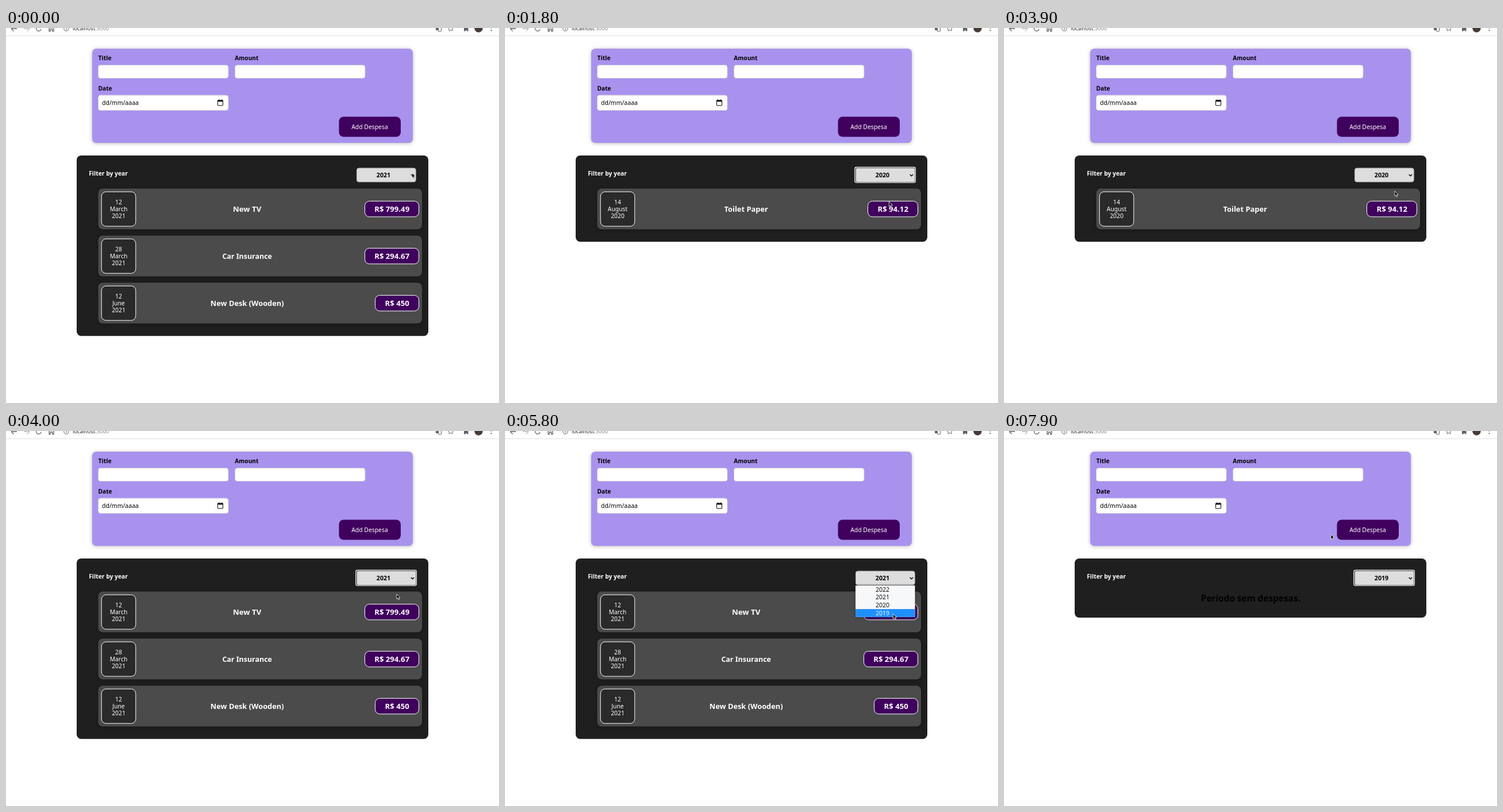
An HTML page for the animation above (8 s loop, 858 px wide and 653 px high).

```html
<!DOCTYPE html>
<html lang="en">
<head>
<meta charset="utf-8">
<title>Expenses by year</title>
<style>
  html, body { margin: 0; width: 100%; height: 100%; overflow: hidden; background: #fff; }
  svg { display: block; font-family: "Noto Sans", "Open Sans", sans-serif; white-space: pre; }
  .shadow { filter: drop-shadow(0 1px 3px rgba(0, 0, 0, .28)); }
</style>
</head>
<body>
<svg id="stage" width="858" height="653" viewBox="0 0 858 653"></svg>
<script>
const LOOP = 8000;
const PURPLE = '#40005d';
const YEARS = [2022, 2021, 2020, 2019];
const EXPENSES = {
  2021: [
    ['12', 'March', 'New TV', 'R$ 799.49', 94, 13.2],
    ['28', 'March', 'Car Insurance', 'R$ 294.67', 94, 12.45],
    ['12', 'June', 'New Desk (Wooden)', 'R$ 450', 76, 12.85]
  ],
  2020: [['14', 'August', 'Toilet Paper', 'R$ 94.12', 87, 12.9]],
  2019: []
};

// Each step: start time, pointer x, pointer y, year, menu (highlighted year or 'blank'), focus ring
const STEPS = [
  [0, 706, 252, 2021],
  [100, 706, 252, 2021, 2021],
  [1800, 668, 302, 2020, 0, true],
  [2100, 674, 297, 2020, 0, true],
  [2200, 688, 283, 2020, 0, true],
  [2300, 703, 269, 2020, 0, true],
  [2400, 712, 261, 2020, 0, true],
  [2600, 711, 260, 2020, 0, true],
  [2700, 710, 259, 2020, 0, true],
  [2900, 710, 259, 2020, 'blank'],
  [3000, 709, 260, 2020, 2020],
  [3100, 702, 264, 2020, 2020],
  [3200, 692, 271, 2020, 2022],
  [3400, 686, 276, 2020, 2022],
  [3500, 682, 282, 2020, 2021],
  [3600, 680, 284, 2020, 2021],
  [3900, 679.5, 283.5, 2020],
  [4000, 679.5, 283.5, 2021, 0, true],
  [4800, 702, 257, 2021, 2021],
  [5000, 672, 274, 2021, 2022],
  [5300, 670, 281, 2021, 2022],
  [5600, 673, 303, 2021, 2020],
  [5800, 675, 318, 2021, 2019],
  [6100, 675, 318, 2019, 0, true],
  [6300, 674.5, 318, 2019, 0, true],
  [6600, 532.5, 313.5, 2019, 0, true],
  [6800, 347, 293, 2019, 0, true],
  [7100, 345.5, 293, 2019, 0, true],
  [7300, 798, 348, 2019, 0, true],
  [7600, 737.5, 312, 2019, 0, true],
  [7900, 568.5, 179.5, 2019, 0, true]
];

const rect = (x, y, w, h, r, fill, extra = '') =>
  `<rect x="${x}" y="${y}" width="${w}" height="${h}" rx="${r}" fill="${fill}" ${extra}/>`;
const path = (d, stroke, width = 1, fill = 'none') =>
  `<path d="${d}" stroke="${stroke}" stroke-width="${width}" fill="${fill}"/>`;
const circle = (x, y, r, fill, extra = '') =>
  `<circle cx="${x}" cy="${y}" r="${r}" fill="${fill}" ${extra}/>`;
const text = (str, x, y, size, fill = '#000', weight = 400, anchor = 'start') =>
  `<text x="${x}" y="${y}" font-size="${size}" fill="${fill}" font-weight="${weight}" text-anchor="${anchor}">${str}</text>`;
const centered = (str, x, y, size, fill, weight) => text(str, x, y, size, fill, weight, 'middle');

function toolbar() {
  const dark = '#5f6368';
  return path('M0 13.5H858', '#dfdfe1') +
    path('M9 1H19M9 1L13.5 5.5', dark, 1.3) +
    path('M31 1H41M41 1L36.5 5.5', '#babcbe', 1.3) +
    path('M52.7 0A4.2 4.2 0 0 0 61 2', dark, 1.3) +
    path('M75 0V5.5H77.3V2H80.7V5.5H83V0', dark, 1.3) +
    circle(105, 1, 4.2, 'none', `stroke="${dark}"`) + path('M105 0V3.5', dark) +
    text('localhost<tspan fill="#80868b">:3000</tspan>', 116, 4, 9.3, '#202124') +
    rect(748, -3, 6, 7, 1, dark) + rect(752.5, -1, 5, 7, 1, '#fff', `stroke="${dark}"`) +
    path('M770.5 0L771.5 5L774 3L776.8 5L777.5 0', dark) +
    path('M797 0V5.5H799.5A1.5 1.5 0 0 1 802.5 5.5H804.5V0Z', 'none', 0, dark) +
    circle(822.5, 0.5, 7.2, '#493936') +
    circle(844.5, 0, 1.1, dark) + circle(844.5, 4.2, 1.1, dark);
}

function form() {
  const field = (x, y, h) => rect(x, y, 226.5, h, 4, '#fff', 'stroke="#cbc6d8"');
  const label = (str, x, y, size) => text(str, x, y, size, '#000', 700);
  return rect(150, 36, 558, 164, 7, '#a892ee', 'class="shadow"') +
    label('Title', 160.5, 56, 10.5) + label('Amount', 398.3, 56, 10.2) + label('Date', 160.5, 108.5, 10.2) +
    field(160.5, 64.5, 23) + field(398.5, 64.5, 23) + field(160.5, 117, 26.5) +
    text('dd/mm/aaaa', 167, 134.3, 10.5) +
    rect(368.5, 126, 9, 9, 0.5, 'none', 'stroke="#000"') + path('M368 127H378', '#000', 2.4) +
    path('M370.5 124.5V127M375.5 124.5V127', '#000', 1.2) +
    rect(579.5, 154.5, 107.5, 35, 8, PURPLE) +
    centered('Add Despesa', 633, 176, 10.4, '#fff');
}

function card([day, month, name, price, width, size], year, i) {
  const date = (str, y) => centered(str, 196, y, 10.35, '#fff');
  return `<g transform="translate(0 ${i * 82})">` +
    rect(160.5, 279.5, 563.5, 71, 8, '#4b4b4b', 'class="shadow"') +
    rect(166.2, 285.2, 59.6, 60, 8, '#2a2a2a', 'stroke="#fff"') +
    date(day, 307) + date(month, 319.2) + date(year, 331.4) +
    centered(name, 419.7, 319.7, size, '#fff', 700) +
    rect(718.5 - width, 301.5, width, 27.3, 8, PURPLE, 'stroke="#fff"') +
    centered(price, 718.7 - width / 2, 319.8, 13.15, '#fff', 700) + '</g>';
}

function select(year, ring) {
  const focus = rect(608.9, 242.5, 105.4, 26.6, 2.5, '#000', 'stroke="#fff" stroke-width="1.3"');
  return (ring ? focus : '') +
    rect(610.5, 244, 102.7, 24, ring ? 2 : 3.5, '#ddd', ring ? '' : 'stroke="#b5b5b5"') +
    centered(year, 657, 260, 10.7, '#000', 700) +
    path('M704.7 255L707.4 257.8L710.1 255', '#000', 1.4);
}

function menu(active) {
  if (active === 'blank') return rect(610, 269, 104, 57, 0, '#2c3640', 'class="shadow"');
  return rect(610, 269, 103.5, 55, 0, '#f7f8f9', 'class="shadow"') + YEARS.map((year, i) => {
    const y = 269 + i * 13.7;
    const on = year === active;
    return (on ? rect(610, y, 103.5, 13.7, 0, '#1e90ff') : '') +
      centered(year, 657, y + 10.6, 10.6, on ? '#eef6ff' : '#111');
  }).join('');
}

const pointer = (x, y) => `<g transform="translate(${x} ${y})">` +
  path('M.4 .4V9L2.4 7.2L3.7 10.5L5.2 9.9L3.9 6.7H6.4Z', '#fff', 0.8, '#000') + '</g>';

function scene([, x, y, year, active, ring]) {
  const list = EXPENSES[year];
  const height = list.length ? 68.3 + list.length * 82 : 103;
  return toolbar() + form() +
    rect(123, 222, 612, height, 8, '#1f1f1f') +
    text('Filter by year', 144.2, 257.2, 10.35, '#fff', 700) +
    select(year, ring) +
    (list.length
      ? list.map((item, i) => card(item, year, i)).join('')
      : centered('Período sem despesas.', 429.2, 297, 15.4, '#000', 700)) +
    (active ? menu(active) : '') + pointer(x, y);
}

const stage = document.getElementById('stage');
let shown;
function draw() {
  const t = performance.now() % LOOP;
  const step = STEPS.findLast(s => s[0] <= t);
  if (step !== shown) stage.innerHTML = scene(shown = step);
  requestAnimationFrame(draw);
}
draw();
</script>
</body>
</html>
```
